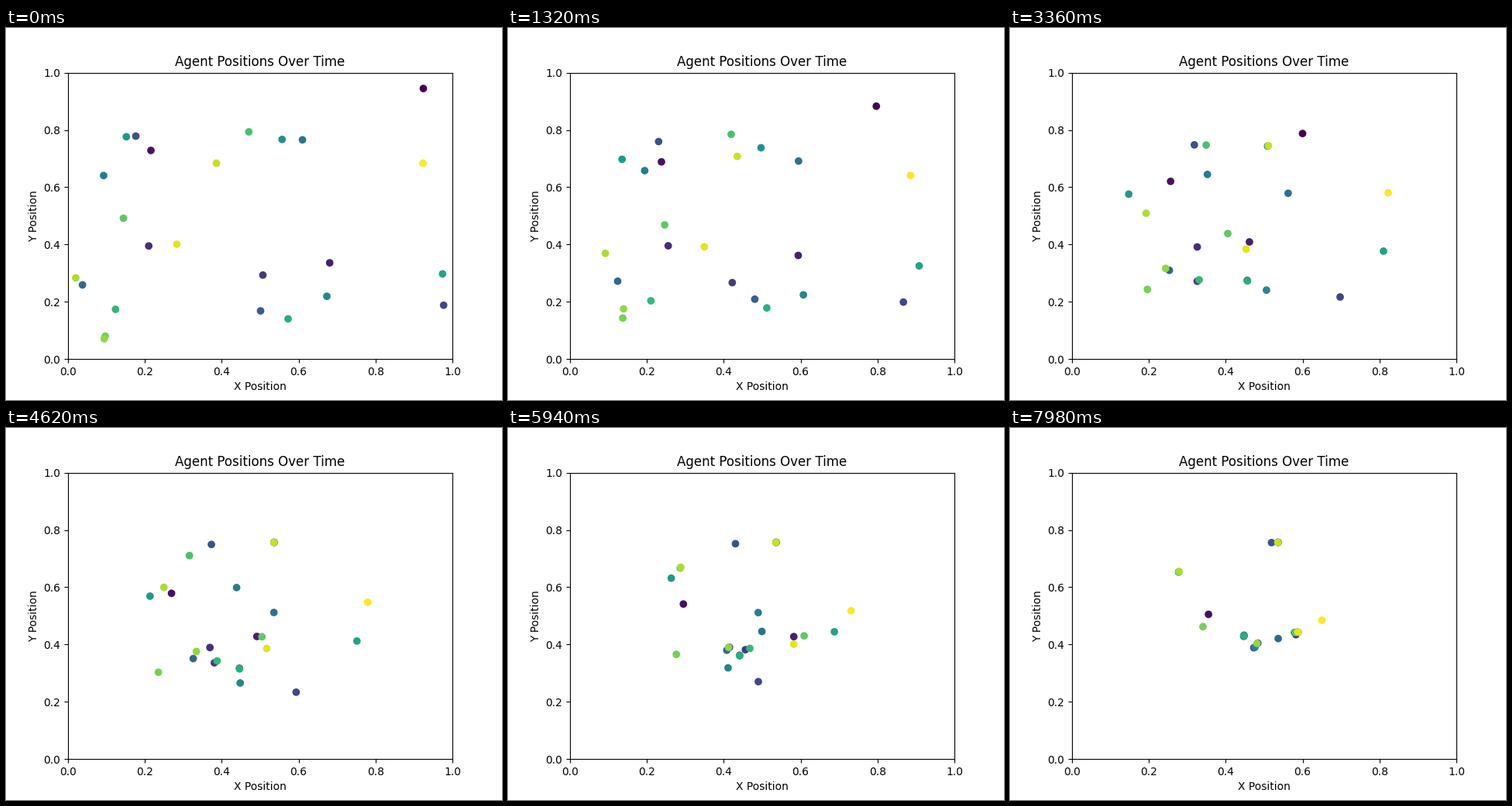
Recreate the animation shown at these times as a matplotlib script. Size 640 by 480 pixels, loop 8 s.

```python
import matplotlib.pyplot as plt
import numpy as np
from itertools import pairwise
from matplotlib.animation import FuncAnimation

INTERVAL = 40   # ms per drawn frame
FRAMES = 200
STEPS = 134     # simulation states, one every 60 ms

# Where the agents start, in colour order.
START = np.array([
    .9244 + .9446j, .2157 + .7284j, .6808 + .336j, .21 + .395j,
    .507 + .2933j, .9772 + .188j, .1764 + .7784j, .501 + .1683j,
    .0377 + .2589j, .6099 + .7654j, .0927 + .6407j, .6734 + .2192j,
    .5569 + .7668j, .1518 + .7762j, .9744 + .2973j, .5726 + .1404j,
    .1236 + .1737j, .4704 + .7933j, .1442 + .4916j, .0968 + .08j,
    .0942 + .0709j, .0202 + .2835j, .3861 + .684j, .2831 + .401j,
    .9234 + .6837j,
])

# Each agent chases the next one in its chain.
CHAINS = [
    (5, 11, 8, 2, 18, 14, 10, 9, 7, 6, 22, 0, 22),
    (13, 21, 17, 13),
    (1, 4, 16, 2),
    (20, 3, 23, 14),
    (19, 12, 22),
    (15, 7),
    (24, 7),
]

# Distance covered in one step, in units of 1e-5.
PACE = np.array([644, 208, 413, 207, 404, 502, 261, 207, 397, 344, 469, 302,
                 303, 366, 326, 328, 417, 236, 476, 341, 518, 508, 248, 305,
                 258])


def simulate():
    """Walk every agent straight at its prey, never past it."""
    prey = np.zeros(len(START), int)
    for chain in CHAINS:
        for hunter, hunted in pairwise(chain):
            prey[hunter] = hunted
    path = [START]
    for _ in range(STEPS - 1):
        pos = path[-1]
        gap = pos[prey] - pos
        reach = PACE * 1e-5 / np.maximum(abs(gap), 1e-9)
        path.append(pos + gap * np.minimum(1, reach))
    return path


path = simulate()

fig, ax = plt.subplots(figsize=(6.4, 4.8), dpi=100)
dots = ax.scatter(START.real, START.imag, c=range(len(START)), cmap="viridis")
ax.set(xlim=(0, 1), ylim=(0, 1), title="Agent Positions Over Time",
       xlabel="X Position", ylabel="Y Position")


def update(frame):
    step = (2 * frame + 1) // 3
    pos = path[min(step, STEPS - 1)]
    dots.set_offsets(np.column_stack([pos.real, pos.imag]))
    return (dots,)


anim = FuncAnimation(fig, update, frames=FRAMES, interval=INTERVAL,
                     repeat=True, repeat_delay=0)
plt.show()
```
